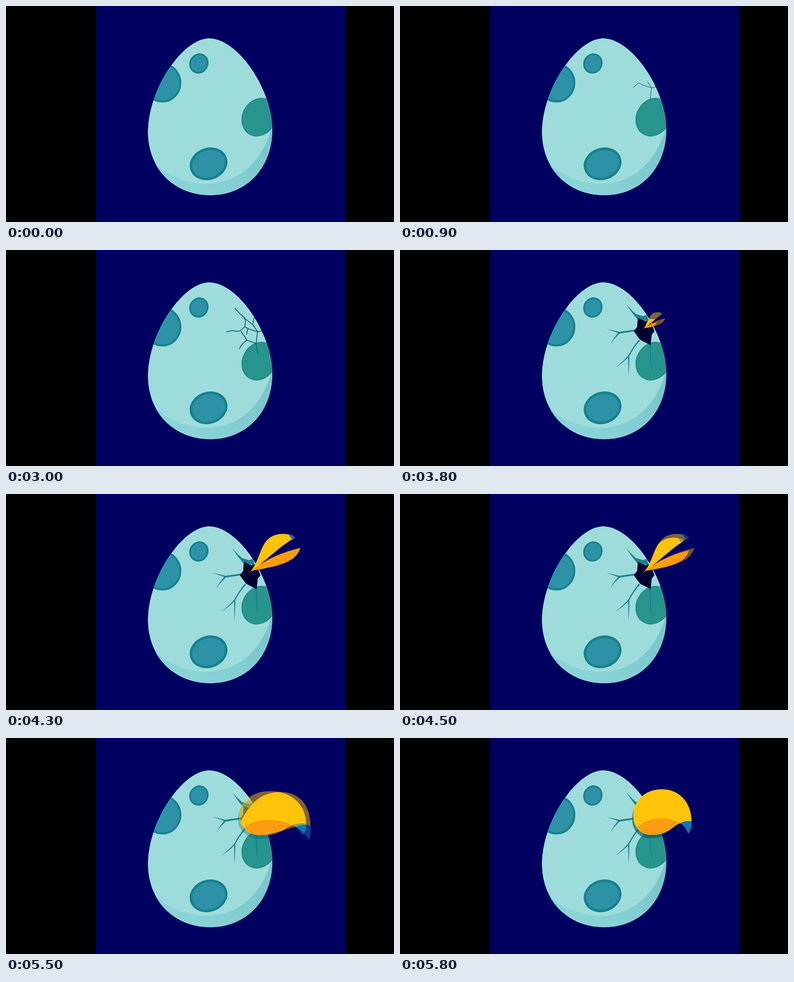
These frames come from a looping animation (692x388 px, 5900 ms). An HTML page:

```html
<!DOCTYPE html>
<html lang="en">
<head>
<meta charset="utf-8">
<title>Hatching egg</title>
<style>
  html, body { margin: 0; width: 100%; height: 100%; overflow: hidden; background: #000; }
  svg { display: block; }
  #cracks path { fill: none; stroke: #17616c; stroke-linejoin: round; }
  #bird { isolation: isolate; }
  #bird use { mix-blend-mode: plus-lighter; }
  #bird use, #shadow { display: none; }
  .spot { fill: #2e92a6; stroke: #17808e; }
  .upper { fill: #fdc30a; }
  .lower { fill: #fb9b10; }
  .tip { fill: #1173b8; }
</style>
</head>
<body>
<svg width="692" height="388" viewBox="0 0 692 388">
  <defs>
    <path id="shell" d="M362 58C315 58 253 150 253 226C253 295 302 340 364 340C428 340 475 292 475 222C475 150 414 58 362 58Z"/>
    <clipPath id="inShell"><use href="#shell"/></clipPath>
    <linearGradient id="shade" x1="0" x2="1" y1="1" y2=".4">
      <stop offset=".3" stop-color="#8ad4d8"/><stop offset="1" stop-color="#79c7cb"/>
    </linearGradient>
    <path id="silhouette" d="M416 140C416 112 438 92 467 92C500 92 520 118 520 150L500 153C485 158 480 174 448 174C428 174 416 158 416 140Z"/>
    <g id="open">
      <path class="lower" d="M438 138C460 118 500 102 525 97C518 118 500 128 438 138Z"/>
      <path class="upper" d="M433 142C452 125 452 92 470 79Q484 68 507 73L515 79C490 92 470 115 433 142Z"/>
      <path class="tip" d="M503 72Q512 73 516 79L510 81Z"/>
    </g>
    <g id="peeking">
      <path class="upper" d="M418 142C420 122 435 109 458 109C480 109 494 122 499 139L487 146C472 148 455 160 446 170C434 167 420 158 418 142Z"/>
      <path class="lower" d="M427 160C440 149 462 147 487 146C472 149 455 160 446 170C438 168 432 165 427 160Z"/>
      <path class="tip" d="M487 146Q493 139 499 139Q502 147 501 155Q495 149 487 146Z"/>
    </g>
    <g id="stretched">
      <path class="upper" d="M418 150C432 128 446 97 490 97C524 97 543 122 543 157L517 160C500 161 480 175 448 174C434 172 425 164 418 150Z"/>
      <path class="lower" d="M425 161C441 144 485 142 517 160C500 161 480 175 448 174C438 173 430 168 425 161Z"/>
      <path class="tip" d="M517 160Q530 154 543 157Q545 171 540 183Q531 167 517 160Z"/>
    </g>
    <g id="closed">
      <use href="#silhouette" class="upper" style="display:inline;mix-blend-mode:normal"/>
      <path class="lower" d="M424 160C440 143 475 139 500 153C485 158 480 174 450 174C438 174 430 169 424 160Z"/>
      <path class="tip" d="M500 153Q510 147 520 150Q521 163 514 172Q510 160 500 153Z"/>
    </g>
  </defs>

  <rect width="692" height="388"/>
  <rect x="160.500" width="445.500" height="388" fill="#000061"/>
  <g clip-path="url(#inShell)">
    <use href="#shell" fill="#9edcdc"/>
    <path fill="url(#shade)" d="M262 280C320 337 440 345 475 215V345H262Z"/>
    <ellipse class="spot" cx="344" cy="103.300" rx="15.500" ry="17" stroke-width="3" transform="rotate(25 344 103.300)"/>
    <ellipse class="spot" cx="279" cy="138" rx="32" ry="33.500" stroke-width="3.500"/>
    <ellipse class="spot" cx="361.300" cy="283.500" rx="32" ry="26.500" stroke-width="4.500" transform="rotate(-20 361.300 283.500)"/>
    <ellipse cx="451.500" cy="199.700" rx="29.500" ry="35" fill="#27948e" stroke="#1d8785" stroke-width="1.500" transform="rotate(28 451.500 199.700)"/>
    <g id="cracks"></g>
    <g id="splits" fill="#1c808e"></g>
    <g id="hole">
      <path fill="#1c808e" d="M421 115L434 119L440 116L444 128L424 124Z"/>
      <path fill="#000032" d="M424 122L438 128L446 126L454 146L449 152L447 171L428 161L417 146L423 138Z"/>
    </g>
    <use id="shadow" href="#silhouette" fill="#07586b"/>
  </g>
  <g id="bird"><use opacity=".5"/><use opacity=".5"/></g>
</svg>
<script>
const LOOP = 5900, STEP = 100;
const $ = id => document.getElementById(id);
const progress = (t, from, to) => Math.min(1, Math.max(0, (t - from) / (to - from)));

function addPath(parent, d) {
  const path = document.createElementNS('http://www.w3.org/2000/svg', 'path');
  path.setAttribute('d', d);
  return parent.appendChild(path);
}

// Hairline cracks: outline, start and end of growth
const cracks = [
  ['M449 147L457 145', 250, 300],
  ['M449 147Q447 154 447 162', 250, 300],
  ['M449 147L433 142', 250, 400],
  ['M433 142L426 138L416 146', 600, 900],
  ['M449 147L440 134L441 127', 600, 1100],
  ['M447 162L446 168', 700, 900],
  ['M416 146L402 145', 1200, 1500],
  ['M426 138L427 126L424 121', 1200, 1600],
  ['M440 134L427 124M441 128L443 121', 1200, 1700],
  ['M431 142L429 152', 1300, 1600],
  ['M427 123L418 115L408 105', 1800, 2400],
  ['M402 145L393 147', 1800, 2200],
  ['M419 146L430 162L446 168', 1900, 2500],
  ['M430 162Q421 167 416 178', 2100, 2700],
  ['M446 168L449 187', 2200, 2800]
].map(([d, from, to]) => {
  const path = addPath($('cracks'), d);
  path.setAttribute('pathLength', 1);
  return { path, from, to };
});

// Tapering splits, each growing out of its root
const splits = [
  [425, 124, 'M-2 0Q-13 -13 -22 -27Q-11 -14 2 -4Z'],
  [419, 144, 'M0 -1L-28 3L-52 -3L-30 5Q-38 14 -44 25Q-36 14 -27 6L0 2Z'],
  [427, 162, 'M-1 -1Q-13 14 -20 28Q-32 41 -44 50Q-31 42 -20 31Q-20 48 -19.500 65Q-18 45 -18 29Q-11 14 1 1Z'],
  [446, 169, 'M-1 0L0 36L5 51L2 35L1 0Z']
].map(([x, y, d]) => ({ x, y, path: addPath($('splits'), d) }));

// Beak shapes in order: end of use, pivot, keys of time and matrix a, b, c, d
const rest = [1, 0, 0, 1];
const beaks = [
  { shape: 'open', until: 4800, pivot: [434, 142], keys: [
    [3600, [0, 0, 0, 0]], [4100, [.86, 0, 0, .86]], [4200, rest], [4500, rest], [4800, [.35, 0, 0, .4]]] },
  { shape: 'peeking', until: 5100, pivot: [418, 150], keys: [
    [4800, [.65, 0, 0, .7]], [4950, [.9, 0, 0, .9]], [5050, rest]] },
  { shape: 'stretched', until: 5500, pivot: [418, 150], keys: [
    [5100, [.8, 0, 0, .85]], [5300, rest]] },
  { shape: 'closed', until: LOOP + STEP, pivot: [418, 150], keys: [
    [5500, [1.2, .06, 0, .97]], [5700, rest]] }
];

function beakAt(t) {
  const { shape, pivot: [x, y], keys } = beaks.find(beak => t < beak.until);
  const next = keys.findIndex(key => key[0] > t);
  const end = next < 0 ? keys.length - 1 : next;
  const [t1, to] = keys[end], [t0, from] = keys[Math.max(0, end - 1)];
  const k = progress(t, t0, Math.max(t1, t0 + 1));
  const [a, b, c, d] = from.map((v, i) => v + (to[i] - v) * k);
  const matrix = [a, b, c, d, x - a * x - c * y, y - b * x - d * y];
  return { shape, transform: `matrix(${matrix})` };
}

function draw(t) {
  const widen = progress(t, 2300, 3000), burst = progress(t, 3000, 3500);
  for (const { path, from, to } of cracks) {
    const k = progress(t, from, to);
    path.style.display = k ? '' : 'none';
    path.style.strokeDasharray = k < 1 ? `${k} 2` : 'none';
  }
  $('cracks').style.strokeWidth = 1 + widen * .5;
  $('cracks').style.opacity = 1 - burst;

  for (const { x, y, path } of splits)
    path.setAttribute('transform', `translate(${x} ${y}) scale(${burst})`);
  $('hole').setAttribute('transform', `translate(436 147) scale(${burst}) translate(-436 -147)`);

  // Two half-strength samples leave a ghost wherever the beak moves
  [...$('bird').children].forEach((beak, i) => {
    const { shape, transform } = beakAt(t + (i ? 50 : -50));
    beak.setAttribute('href', '#' + shape);
    beak.setAttribute('transform', transform);
    beak.style.display = t > 3600 ? 'inline' : 'none';
  });
  const { shape, transform } = beakAt(t);
  $('shadow').style.display = shape === 'closed' ? 'inline' : 'none';
  $('shadow').style.opacity = .65 * progress(t, 5300, 5700);
  $('shadow').setAttribute('transform', 'translate(-2 6) ' + transform);
}

function tick() {
  draw(Math.floor(performance.now() % LOOP / STEP) * STEP);
  requestAnimationFrame(tick);
}
tick();
</script>
</body>
</html>
```
